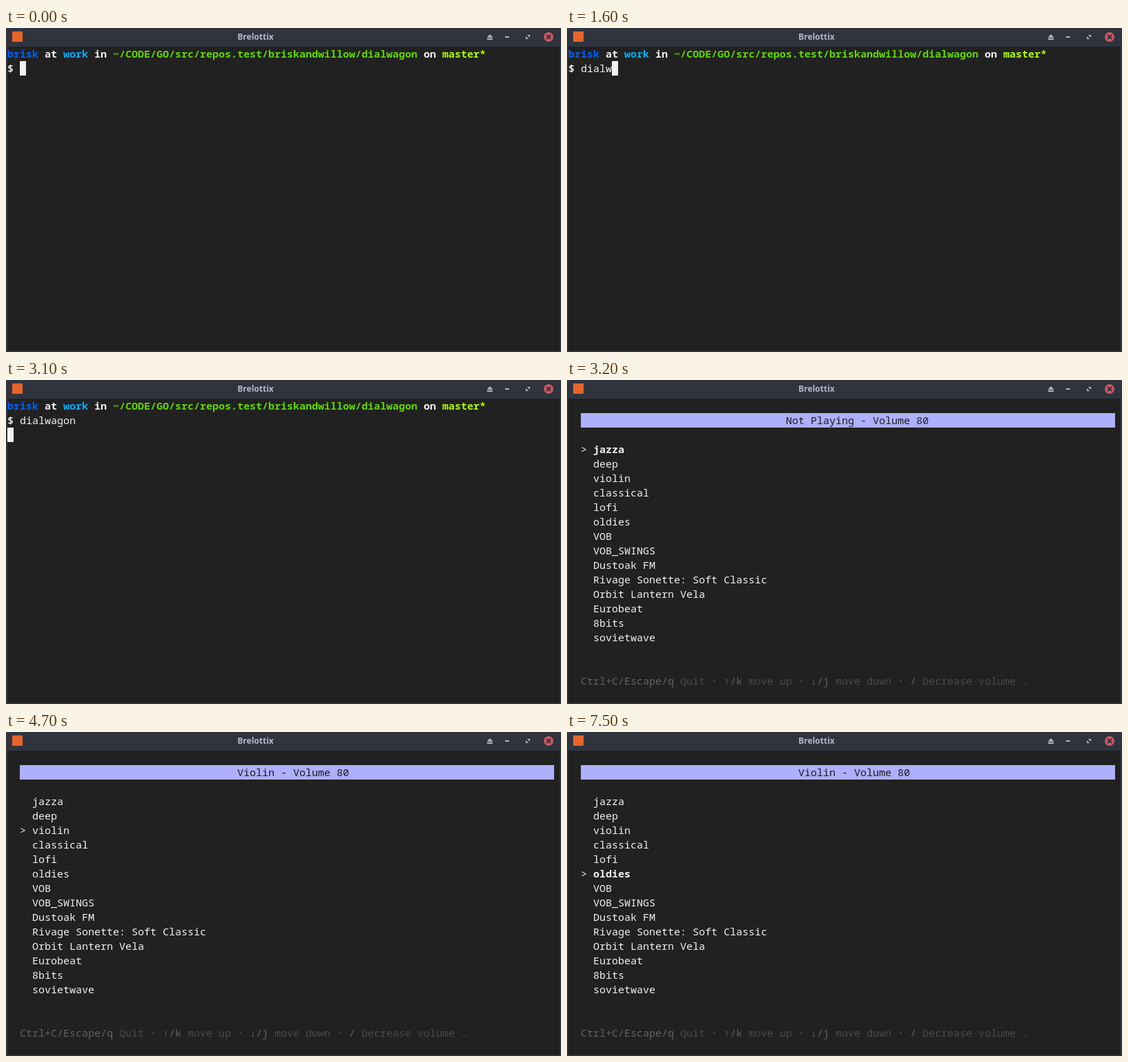
Write an HTML page with a canvas that moves like this. It is 804 px wide and 470 px high and loops after 8 s.

```html
<!DOCTYPE html>
<html lang="en">
<head>
<meta charset="utf-8">
<title>Terminal radio player</title>
<style>
  html, body { margin: 0; width: 100%; height: 100%; overflow: hidden; background: #212121; }
  canvas { display: block; width: 804px; height: 470px; }
</style>
</head>
<body>
<canvas id="stage" width="804" height="470"></canvas>
<script>
const ctx = document.getElementById('stage').getContext('2d');
const LOOP = 8000;
const CELL_W = 9, CELL_H = 21, LEFT = 2, TOP = 27;
const FRAME = '#2f343f', BACK = '#212121', FORE = '#f1f1f1', ICON = '#b4bac6';
const MONO = '15px "Noto Sans Mono", "DejaVu Sans Mono", monospace';

const COMMAND = 'dialwagon';
const KEY_TIMES = [800, 1000, 1200, 1400, 1600, 1900, 2200, 2400, 2500];
const ENTER = 3100, OPEN = 3200, PLAY = 4700;
const MOVE_TIMES = [4200, 4400, 6400, 7000, 7500];
const PLAYED = 2;

const STATIONS = [
  'jazza', 'deep', 'violin', 'classical', 'lofi', 'oldies', 'VOB', 'VOB_SWINGS',
  'Dustoak FM', 'Rivage Sonette: Soft Classic', 'Orbit Lantern Vela',
  'Eurobeat', '8bits', 'sovietwave'
];

const PROMPT = [
  ['brisk', '#005fff'], [' at ', FORE], ['work', '#00afff'], [' in ', FORE],
  ['~/CODE/GO/src/repos.test/briskandwillow/dialwagon', '#5fd700'],
  [' on ', FORE], ['master*', '#afff00']
];

const KEY = '#626262', DESC = '#4a4a4a', SEP = '#3c3c3c';
const HELP = [
  ['Ctrl+C/Escape/q', KEY], [' Quit', DESC], [' • ', SEP],
  ['↑/k', KEY], [' move up', DESC], [' • ', SEP],
  ['↓/j', KEY], [' move down', DESC], [' • ', SEP],
  ['/', KEY], [' Decrease volume', DESC], [' …', SEP]
];

const countPast = (times, t) => times.filter(x => t >= x).length;

function rect(x, y, w, h, color) {
  ctx.fillStyle = color;
  ctx.fillRect(x, y, w, h);
}

function poly(color, ...points) {
  ctx.fillStyle = color;
  ctx.beginPath();
  points.forEach(([x, y]) => ctx.lineTo(x, y));
  ctx.fill();
}

function cells(col, row, width, color) {
  rect(LEFT + col * CELL_W, TOP + row * CELL_H, width * CELL_W, CELL_H, color);
}

function write(text, col, row, color = FORE, bold = false) {
  ctx.font = (bold ? 'bold ' : '') + MONO;
  ctx.fillStyle = color;
  ctx.fillText(text, LEFT + col * CELL_W, TOP + row * CELL_H + 16);
}

function writeRuns(runs, col, row, bold) {
  for (const [text, color] of runs) {
    write(text, col, row, color, bold);
    col += text.length;
  }
}

function drawWindow() {
  rect(0, 0, 804, 470, FRAME);
  rect(2, TOP, 800, 441, BACK);
  rect(9, 5, 15, 15, '#e8642a');

  ctx.font = 'bold 12px "Noto Sans", sans-serif';
  ctx.fillStyle = ICON;
  ctx.textAlign = 'center';
  ctx.fillText('Brelottix', 361.5, 17);
  ctx.textAlign = 'left';

  poly(ICON, [701, 9], [705.5, 14], [696.5, 14]);
  rect(697, 15, 8, 2, ICON);
  rect(723, 12, 6, 2, ICON);
  poly(ICON, [755, 10], [759, 10], [759, 14]);
  poly(ICON, [753, 12], [757, 16], [753, 16]);

  ctx.fillStyle = '#cc575d';
  ctx.beginPath();
  ctx.arc(786, 13, 7, 0, Math.PI * 2);
  ctx.fill();
  ctx.strokeStyle = FRAME;
  ctx.lineWidth = 2;
  ctx.beginPath();
  ctx.moveTo(783, 10);
  ctx.lineTo(789, 16);
  ctx.moveTo(789, 10);
  ctx.lineTo(783, 16);
  ctx.stroke();
}

function drawShell(t) {
  const typed = countPast(KEY_TIMES, t);
  writeRuns(PROMPT, 0, 0, true);
  write('$', 0, 1, FORE, true);
  write(COMMAND.slice(0, typed), 2, 1);
  if (t < ENTER) cells(2 + typed, 1, 1, FORE);
  else cells(0, 2, 1, FORE);
}

function drawPlayer(t) {
  const playing = t >= PLAY;
  const selected = countPast(MOVE_TIMES, t);
  cells(2, 1, 86, '#afafff');
  if (playing) write('Violin - Volume 80', 37, 1, '#1c1c1c');
  else write('Not Playing - Volume 80', 35, 1, '#1c1c1c');

  STATIONS.forEach((name, i) => {
    const bold = i === selected && !(playing && i === PLAYED);
    write(name, 4, 3 + i, FORE, bold);
  });
  write('>', 2, 3 + selected);
  writeRuns(HELP, 2, 19, false);
}

function draw(now) {
  const t = now % LOOP;
  drawWindow();
  if (t < OPEN) drawShell(t);
  else drawPlayer(t);
}

let start;
function tick(now) {
  start ??= now;
  draw(now - start);
  requestAnimationFrame(tick);
}
draw(0);
requestAnimationFrame(tick);
</script>
</body>
</html>
```
